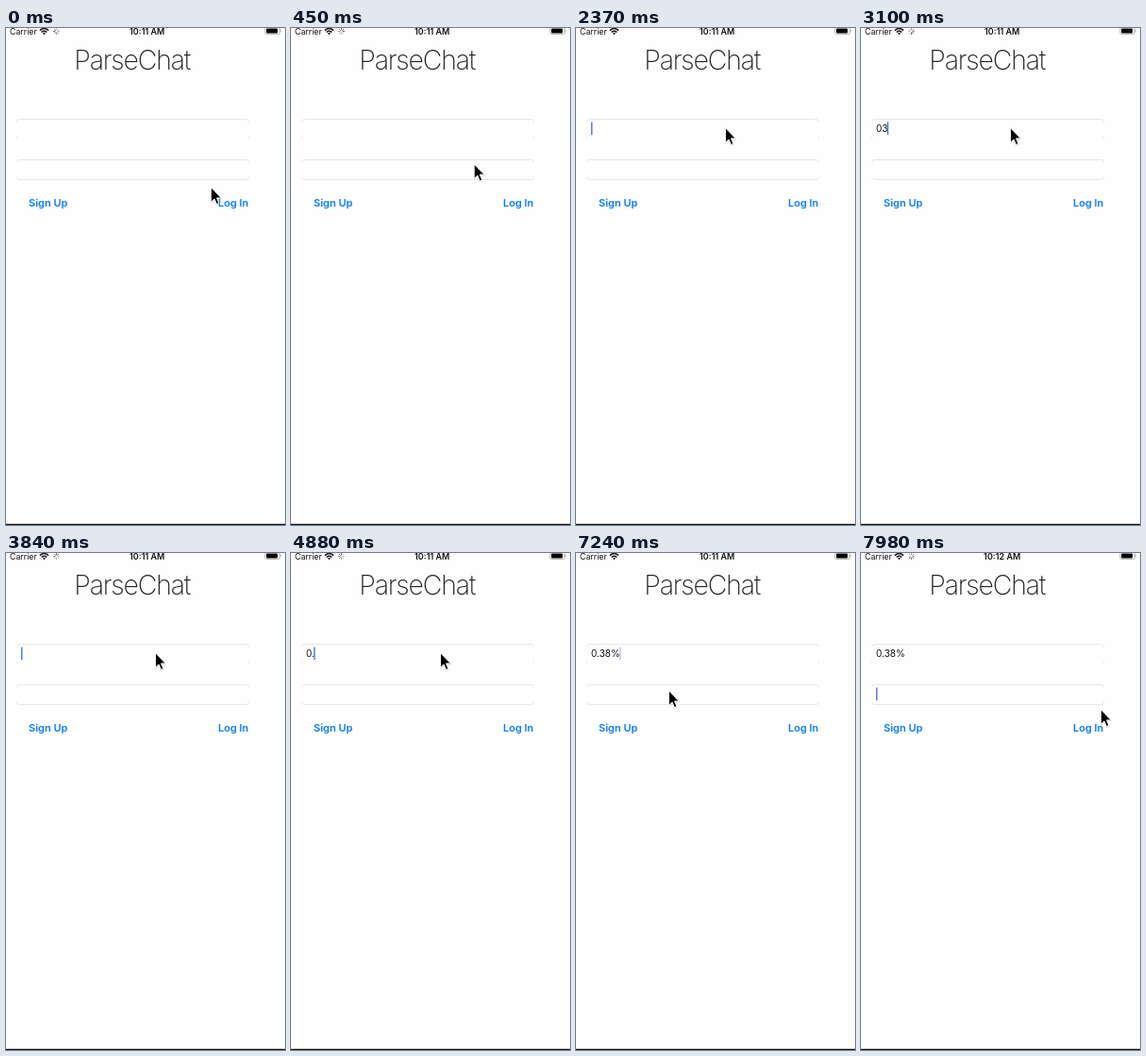
An HTML page for the animation above (8000 ms loop, 296 px wide and 526 px high).

```html
<!DOCTYPE html>
<html lang="en">
<head>
<meta charset="utf-8">
<title>ParseChat</title>
<style>
  html, body { margin: 0; width: 100%; height: 100%; overflow: hidden; background: #fefefe; }
  svg { display: block; width: 100%; height: 100%; font-family: Inter, Roboto, sans-serif; }
  .link { font-size: 11px; font-weight: 600; fill: #0a7cf5; }
</style>
</head>
<body>
<svg viewBox="0 0 296 526">
  <rect width="296" height="526" fill="#fefefe"/>
  <rect y="524.8" width="296" height="1.2" fill="#111"/>

  <text x="4" y="7" font-size="8.8" fill="#111">Carrier</text>
  <g fill="none" stroke="#111" stroke-width="1.5">
    <path d="M35.9 2.6Q40.5 -1.6 45.1 2.6"/>
    <path d="M37.7 4.5Q40.5 2 43.3 4.5"/>
  </g>
  <path d="M38.9 5.6Q40.5 4.4 42.1 5.6L40.5 7.3Z" fill="#111"/>
  <g id="spinner" stroke="#333" stroke-width=".9" stroke-linecap="round"></g>
  <text id="clock" x="149.7" y="7" font-size="9" font-weight="600" text-anchor="middle" fill="#111"></text>
  <rect x="274.9" y="-.6" width="15.6" height="7.2" rx="1.8" fill="none" stroke="#999" stroke-width=".7"/>
  <rect x="276.2" y=".6" width="12" height="4.9" rx=".9" fill="#000"/>
  <path d="M291.4 1.7q1.5 1.3 0 2.6z" fill="#888"/>

  <text x="133.8" y="44" font-size="28.5" font-weight="200" letter-spacing="-1.2" text-anchor="middle" fill="#222">ParseChat</text>

  <g fill="none" stroke="#e6e6e6" stroke-width="1">
    <path d="M11.5 99.5Q11.5 96.5 14.5 96.5H254.5Q257.5 96.5 257.5 99.5"/>
    <path d="M11.5 114.5v2M257.5 114.5v2"/>
    <path d="M11.5 142.5Q11.5 139.5 14.5 139.5H254.5Q257.5 139.5 257.5 142.5"/>
    <path d="M11.5 157.5Q11.5 160.5 14.5 160.5H254.5Q257.5 160.5 257.5 157.5"/>
  </g>
  <text id="user" x="16" y="110" font-size="10" fill="#111"></text>
  <rect id="caret" width="1.3" height="13.5" fill="#4767e2"/>

  <text class="link" x="24" y="189">Sign Up</text>
  <text class="link" x="225" y="189">Log In</text>

  <g id="cursor">
    <path d="M.8 1.5V17.3L4.3 14 6.7 19.5 9.4 18.3 7 12.9H11.8Z" fill="#000" opacity=".14" stroke="#000" stroke-width="1"/>
    <path d="M.5 .7V16.3L4.1 12.9 6.5 18.6 9 17.5 6.6 11.9H11.4Z" fill="#000" stroke="#fff" stroke-width="1"/>
  </g>
</svg>
<script>
const LOOP = 8000, TICK = 147.6; // the screen refreshes once per tick
const $ = id => document.getElementById(id);
const [spinner, clock, user, caret, cursor] =
  ['spinner', 'clock', 'user', 'caret', 'cursor'].map($);

// All times below are in ticks.
const typing = [[0, ''], [9, ''], [17, '0'], [18, '03'], [24, '0'], [25, ''], [30, '0'],
  [32, '0.'], [35, '0.3'], [42, '0.38'], [45, '0.38%']];
const loading = [[0, 9], [12, 16], [18, 22], [24, 28], [32, 36], [38, 42], [45, 49], [52, 56]];
const path = [[0, 217, 168], [7, 158, 105], [46, 158, 105], [49, 98, 145],
  [50, 97, 153], [52, 97, 153], [54, 254, 165]];
const focusAt = 9, nextFieldAt = 52;

const clamp = v => Math.max(0, Math.min(1, v));
const ease = v => v * v * (3 - 2 * v);

for (let i = 0; i < 8; i++) {
  const spoke = document.createElementNS('http://www.w3.org/2000/svg', 'path');
  spoke.setAttribute('d', 'M53.5 1.9V.5');
  spoke.setAttribute('transform', `rotate(${i * 45} 53.5 3.5)`);
  spinner.append(spoke);
}

function pointer(n) {
  const i = path.findIndex(p => p[0] > n);
  if (i < 0) return path[path.length - 1].slice(1);
  const [t0, x0, y0] = path[i - 1], [t1, x1, y1] = path[i];
  const k = ease((n - t0) / (t1 - t0));
  return [x0 + (x1 - x0) * k, y0 + (y1 - y0) * k];
}

// Solid for half a second, fades out, then returns.
function blink(ms) {
  const p = ms % 1000;
  return p < 850 ? 1 - clamp((p - 500) / 150) : clamp((p - 880) / 120);
}

function draw(ms) {
  const n = Math.floor(ms / TICK);

  spinner.style.display = loading.some(([a, b]) => n >= a && n < b) ? '' : 'none';
  [...spinner.children].forEach((s, i) =>
    s.setAttribute('opacity', .3 + .6 * ((i - n + 64) % 8) / 7));

  clock.textContent = n < nextFieldAt ? '10:11 AM' : '10:12 AM';

  const [keyAt, text] = typing.filter(k => k[0] <= n).pop();
  user.textContent = text;

  const second = n >= nextFieldAt;
  const width = text && !second ? user.getComputedTextLength() : 0;
  caret.setAttribute('x', 16.1 + Math.max(0, width - .8));
  caret.setAttribute('y', second ? 142.5 : 99.5);
  caret.setAttribute('opacity', n < focusAt ? 0 : blink((n - (second ? nextFieldAt : keyAt)) * TICK));

  const [x, y] = pointer(n);
  cursor.setAttribute('transform', `translate(${x} ${y})`);
}

const start = performance.now();
function frame() {
  draw((performance.now() - start) % LOOP);
  requestAnimationFrame(frame);
}
draw(0);
requestAnimationFrame(frame);
</script>
</body>
</html>
```
